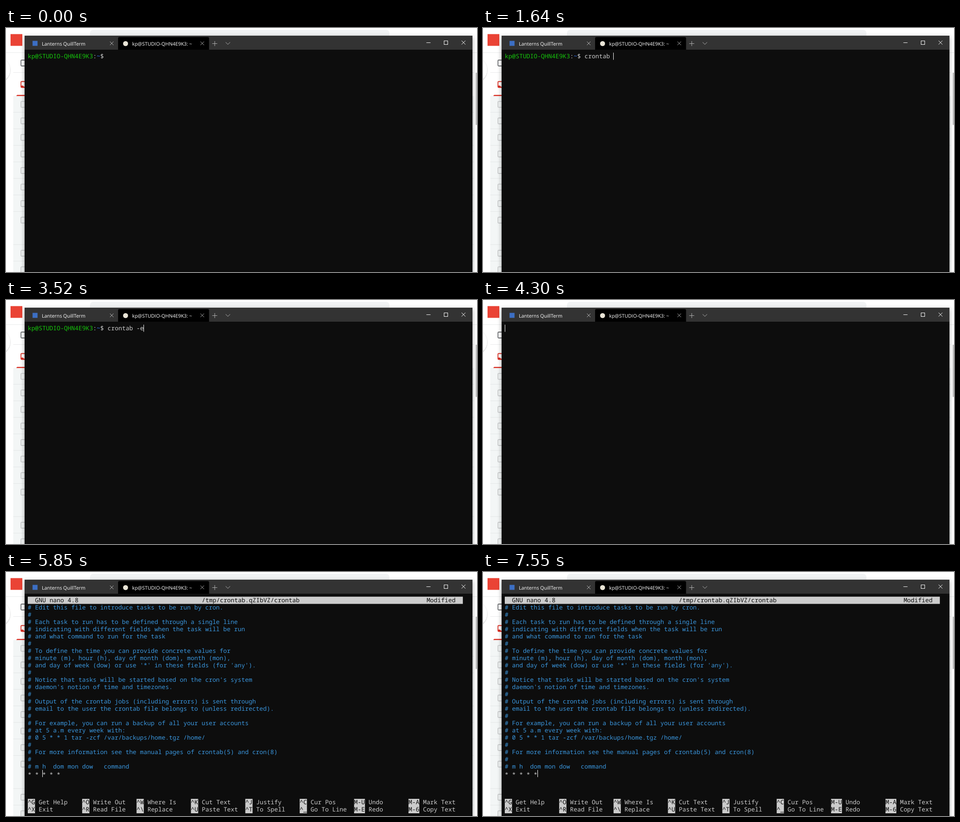
An HTML page for the animation above (8000 ms loop, 1038 px wide and 540 px high).

```html
<!DOCTYPE html>
<html lang="en">
<head>
<meta charset="utf-8">
<title>Terminal: editing a crontab</title>
<style>
  html, body { margin: 0; width: 100%; height: 100%; overflow: hidden; background: #fff; }
  svg { display: block; width: 100vw; height: 100vh; }
  text { white-space: pre; text-rendering: geometricPrecision; }
  .mono { font: 13.317px "Noto Sans Mono", "DejaVu Sans Mono", monospace; }
  .ui { font: 10.8px "Open Sans", "Noto Sans", sans-serif; fill: #fff; }
</style>
</head>
<body>
<svg id="stage" viewBox="0 0 1038 540" xmlns="http://www.w3.org/2000/svg">
  <defs>
    <filter id="shadow" x="-5%" y="-5%" width="110%" height="115%">
      <feDropShadow dx="0" dy="3" stdDeviation="5" flood-opacity=".36"/>
    </filter>
    <filter id="soft" x="-30%" y="-30%" width="160%" height="160%">
      <feDropShadow dx="0" dy="1" stdDeviation="1.2" flood-opacity=".3"/>
    </filter>
  </defs>

  <!-- page behind the window -->
  <rect width="1038" height="540" fill="#fff"/>
  <rect x="185" y="4" width="660" height="40" rx="7" fill="#f1f3f4"/>
  <rect x="10" y="13.5" width="26" height="26" fill="#ea4335"/>
  <path d="M0 54.5H1038M16 98.5H1031" stroke="#e9eaeb"/>
  <circle cx="-18.8" cy="92.5" r="27.8" fill="#fff" filter="url(#soft)"/>
  <rect x="33" y="71" width="13" height="13" rx="1.5" fill="none" stroke="#6b6d70" stroke-width="1.8"/>
  <rect x="33" y="118.5" width="13" height="13" rx="1.5" fill="none" stroke="#d93025" stroke-width="1.8"/>
  <path d="M33 127.5h4.5l2 2.2H46V132H33z" fill="#d93025"/>
  <rect x="16" y="150.5" width="1015" height="390" fill="#f3f6f6"/>
  <path d="M23 150.5q0-2.5 2.5-2.5H60v2.5z" fill="#d93025"/>
  <g id="rows"></g>
  <rect x="1035" y="99" width="4" height="115.5" fill="#c1c1c1"/>

  <!-- window -->
  <rect x="41" y="17" width="987" height="540" fill="#0c0c0c" filter="url(#shadow)"/>
  <rect x="41" y="17" width="987" height="31" fill="#333"/>
  <path d="M247 48V23q0-3 3-3H444.500q3 0 3 3V48z" fill="#000"/>
  <rect x="58.500" y="28.500" width="11" height="11" fill="#3c6fc4"/>
  <circle cx="263.500" cy="34.500" r="5.500" fill="#e9e4d6"/>
  <text class="ui" x="79" y="38.500">Lanterns QuillTerm</text>
  <text class="ui" x="278" y="38.500">kp@STUDIO-QHN4E9K3: ~</text>
  <g fill="none" stroke="#b4b4b4">
    <path d="M229 30l8 8m0-8l-8 8M428.500 30l8 8m0-8l-8 8"/>
    <path d="M454.500 34.500h11m-5.500-5.500v11M484 31.500l5 4.800 5-4.800"/>
  </g>
  <g fill="none" stroke="#fff">
    <path d="M926.500 32.500h9M1004 28l8.500 8.500m0-8.500l-8.500 8.500"/>
    <rect x="965.500" y="28.500" width="8" height="8"/>
  </g>

  <!-- terminal -->
  <g id="shell"></g>
  <g id="editor"></g>
  <rect id="cursor" width="1" height="15.800" fill="#fff"/>
</svg>

<script>
const LOOP = 8000, LEFT = 48, TOP = 54.6, CW = 7.99, LH = 15.98;
const GREY = '#cccccc', DARK = '#0c0c0c', BLUE = '#3a96dd';
const byId = id => document.getElementById(id);
const colX = c => LEFT + c * CW;
const rowY = r => TOP + r * LH;

function add(parent, tag, attrs, content = '') {
  const el = document.createElementNS('http://www.w3.org/2000/svg', tag);
  for (const k in attrs) el.setAttribute(k, attrs[k]);
  el.textContent = content;
  parent.appendChild(el);
  return el;
}

const write = (parent, col, row, str, fill = GREY, dy = 0) =>
  add(parent, 'text', { class: 'mono', x: colX(col), y: rowY(row) + 12.4 + dy, fill }, str);

const bar = (parent, col, row, cols) =>
  add(parent, 'rect', { x: colX(col), y: rowY(row), width: cols * CW, height: LH, fill: GREY });

// Mail list rows; the eighth one is double height
const rows = byId('rows');
for (let i = 0; i < 11; i++) {
  const step = i * 36.6;
  if (i !== 7) add(rows, 'rect', { x: 16, y: 186 + step, width: 1015, height: 1, fill: '#e3e6e7' });
  if (i !== 8) add(rows, 'rect', { x: 33, y: 162.500 + step, width: 13, height: 13, rx: 1.5,
    fill: 'none', stroke: '#c6c8c9', 'stroke-width': 1.7 });
}

// Shell prompt
const shell = byId('shell');
write(shell, 0, 0, 'kp@STUDIO-QHN4E9K3', '#16c60c');
write(shell, 18, 0, ':');
write(shell, 19, 0, '~', '#3b78ff');
write(shell, 20, 0, '$');
const typed = write(shell, 22, 0, '');

// Editor screen
const editor = byId('editor');
bar(editor, 0, 0, 120);
write(editor, 2, 0, 'GNU nano 4.8', DARK);
write(editor, 48, 0, '/tmp/crontab.qZIbVZ/crontab', DARK);
write(editor, 110, 0, 'Modified', DARK);

const comments = `Edit this file to introduce tasks to be run by cron.

Each task to run has to be defined through a single line
indicating with different fields when the task will be run
and what command to run for the task

To define the time you can provide concrete values for
minute (m), hour (h), day of month (dom), month (mon),
and day of week (dow) or use '*' in these fields (for 'any').

Notice that tasks will be started based on the cron's system
daemon's notion of time and timezones.

Output of the crontab jobs (including errors) is sent through
email to the user the crontab file belongs to (unless redirected).

For example, you can run a backup of all your user accounts
at 5 a.m every week with:
0 5 * * 1 tar -zcf /var/backups/home.tgz /home/

For more information see the manual pages of crontab(5) and cron(8)

m h  dom mon dow   command`.split('\n');
comments.forEach((line, i) => write(editor, 0, i + 1, '# ' + line, BLUE));
write(editor, 0, 24, '* * * * *', GREY, 2.5);

const help = [
  '^G Get Help|^O Write Out|^W Where Is|^K Cut Text|^J Justify|^C Cur Pos|M-U Undo|M-A Mark Text',
  '^X Exit|^R Read File|^\\ Replace|^U Paste Text|^T To Spell|^_ Go To Line|M-E Redo|M-6 Copy Text'
];
help.forEach((line, r) => line.split('|').forEach((item, i) => {
  const cut = item.indexOf(' '), col = i * 15, row = 28 + r;
  bar(editor, col, row, cut);
  write(editor, col, row, item.slice(0, cut), DARK);
  write(editor, col + cut + 1, row, item.slice(cut + 1));
}));

// Timing in ms
const COMMAND = 'crontab -e';
const keyTimes = [80, 390, 790, 940, 1170, 1250, 1400, 1640, 2190, 2270];
const moveTimes = [5240, 5470, 5620, 5850, 6080, 6250, 6400, 6550, 6710];
const CLEAR = 4300, OPEN = 4380;
const hidden = [[0, 80], [2970, 3520], [5160, 5240], [6860, 6940]];
const passed = (times, t) => times.filter(x => t >= x).length;

const cursor = byId('cursor');
const show = (el, on) => el.setAttribute('visibility', on ? 'visible' : 'hidden');

function render(t) {
  const keys = passed(keyTimes, t);
  typed.textContent = COMMAND.slice(0, keys);
  show(shell, t < CLEAR);
  show(editor, t >= OPEN);

  let col = 22 + keys, row = 0;
  if (t >= CLEAR) col = 0;
  if (t >= OPEN) {
    const below = t >= 6940 && t < 7550;
    row = below ? 25 : 24;
    col = below ? 0 : passed(moveTimes, t);
  }
  cursor.setAttribute('x', Math.floor(colX(col) + 0.25));
  cursor.setAttribute('y', rowY(row));
  show(cursor, !hidden.some(([from, to]) => t >= from && t < to));
}

const start = performance.now();
function tick() {
  render((performance.now() - start) % LOOP);
  requestAnimationFrame(tick);
}
render(0);
requestAnimationFrame(tick);
</script>
</body>
</html>
```
